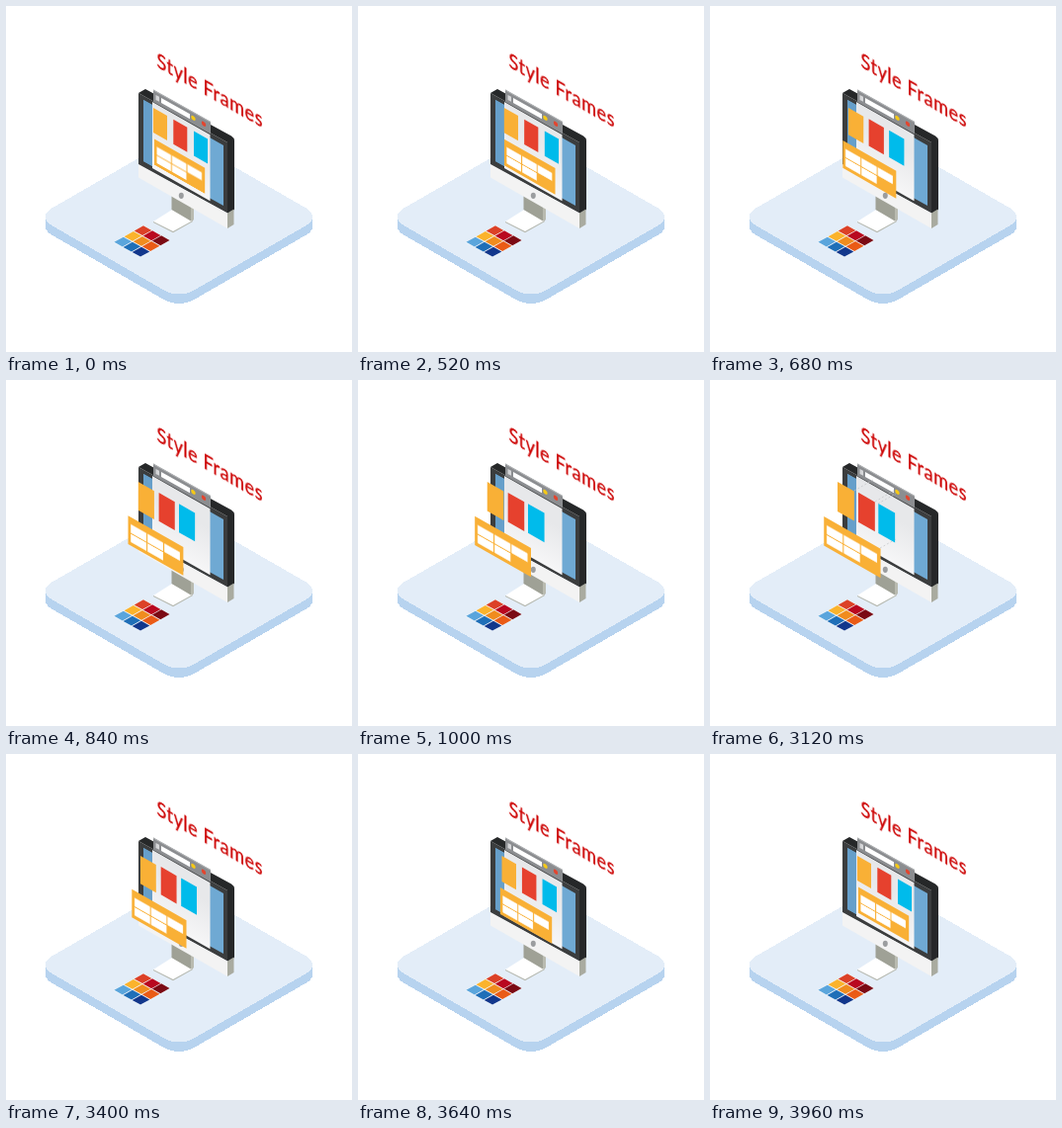
An HTML page for the animation above (4840 ms loop, 350 by 350 pixels).

```html
<!DOCTYPE html>
<html lang="en">
<head>
<meta charset="utf-8">
<title>Style Frames</title>
<style>
  html, body { margin: 0; width: 100%; height: 100%; overflow: hidden; background: #fff; }
  svg { display: block; width: 100vw; height: 100vh; }
  text { font: 400 21px Lato, "Open Sans", sans-serif; letter-spacing: .6px;
         fill: #c00; stroke: #c00; stroke-width: .3; }
  .crisp { shape-rendering: crispEdges; }

  .float { transform: var(--in); animation: float 4840ms infinite; }
  .dashes { fill: none; stroke: #c3c5c8; stroke-width: .8; stroke-dasharray: 2 2; opacity: 0;
            animation: dashes 4840ms linear infinite; }

  .amber { --in: translate(149px, 103px) scale(1); --out: translate(129px, 103px) scale(1.2); }
  .red   { --in: translate(169.3px, 114.7px) scale(1); --out: translate(150px, 113.8px) scale(1.2); }
  .cyan  { --in: translate(190px, 126.5px) scale(1); --out: translate(170.3px, 125px) scale(1.2); }
  .panel { --in: translate(150px, 134.5px) scale(1); --out: translate(115.2px, 138px) scale(1.12); }

  @keyframes float {
    0% { transform: var(--in); }
    9.917% { transform: var(--in); animation-timing-function: cubic-bezier(.25, .25, .25, 1); }
    27.273% { transform: var(--out); }
    64.05% { transform: var(--out); animation-timing-function: cubic-bezier(.4, 0, .4, 1); }
    81.818%, 100% { transform: var(--in); }
  }
  @keyframes dashes {
    0%, 21.488% { opacity: 0; }
    27.273%, 64.05% { opacity: 1; }
    68.18%, 100% { opacity: 0; }
  }
</style>
</head>
<body>
<svg viewBox="0 0 350 350">
  <defs>
    <rect id="slab" x="-83" y="-83" width="166" height="166" rx="17"/>
    <rect id="card" width="14" height="25" transform="matrix(1 .57 0 1 0 0)"/>
    <linearGradient id="page" x2="0" y2="1">
      <stop offset=".3" stop-color="#e7e8ea"/>
      <stop offset="1" stop-color="#f6f6f7"/>
    </linearGradient>
  </defs>

  <!-- platform -->
  <g class="crisp" fill="#b7d3ef">
    <use href="#slab" transform="matrix(.866 .5 -.866 .5 175 222.800)"/>
    <use href="#slab" transform="matrix(.866 .5 -.866 .5 175 219.500)"/>
    <use href="#slab" transform="matrix(.866 .5 -.866 .5 175 216.500)"/>
  </g>
  <use class="crisp" href="#slab" transform="matrix(.866 .5 -.866 .5 175 213.300)" fill="#e3edf8"/>

  <!-- swatches: one unit per cell -->
  <g transform="matrix(9.100 5.050 -10.100 5.700 139 221.800)">
    <rect width="3" height="3" fill="#f4f7fb"/>
    <g id="swatches"></g>
  </g>

  <!-- stand -->
  <path d="M149 218L168 206L189 217L169 228Z" fill="#fff"/>
  <path d="M149 218L169 228L189 217V218L169 229.200L149 219Z" fill="#b5b7ac"/>
  <path d="M167.500 190L190 203V216L187 217.500L167.500 206Z" fill="#9fa196"/>
  <path d="M187 201L190 203V216L187 217.500Z" fill="#b9bbb0"/>

  <!-- monitor -->
  <path d="M134 88L141 84L228 131.500Q231 133.500 231 136V206L224 210V138Z" fill="#262829"/>
  <path d="M224 209.500L230.500 205.500V221L224 225Z" fill="#a9aba0"/>
  <path d="M134 88L224 138V209.500L134 160.500Z" fill="#3b3d3e"/>
  <path d="M134 160L224 209.500V225L134 173.500Z" fill="#f3f3f3"/>
  <path d="M139 95L220 141V202L139 157Z" fill="#6fa9d3"/>
  <path d="M139 95L148 100V162L139 157Z" fill="#669fca"/>
  <ellipse cx="177.300" cy="191.800" rx="2.500" ry="3.100" fill="#9b9d9f"/>

  <!-- browser window -->
  <rect width="58.500" height="67" transform="matrix(1 .57 0 1 148 97)" fill="url(#page)"/>
  <g transform="matrix(1 .56 0 1 149 84.500)">
    <rect width="58" height="12.500" fill="#8b8d90"/>
    <rect width="58" height="1" fill="#b4b6b8"/>
    <rect x="2.500" y="4" width="3.500" height="5" fill="#d5d6d8"/>
    <rect x="8" y="4" width="29" height="5" fill="#fff"/>
    <circle cx="40.500" cy="6.200" r="2.200" fill="#f6c915"/>
    <circle cx="51" cy="6.200" r="2.200" fill="#e2452f"/>
  </g>

  <path class="dashes" d="M146 112L165 101M167 123L186 112M172 170L188 161M170 125L188 115"/>

  <!-- floating parts -->
  <use href="#card" class="float amber" fill="#f9b036"/>
  <use href="#card" class="float red" fill="#e6412e"/>
  <use href="#card" class="float cyan" fill="#00bbeb"/>
  <g class="float panel">
    <g transform="matrix(1 .57 0 1 0 0)">
      <rect width="51" height="26" fill="#f9b036"/>
      <path d="M2.500 6.500h14.500v8H2.500ZM18 6.500h14.500v8H18ZM33.500 6.500h14.500v8H33.500ZM2.500 15.500h14.500v7.500H2.500ZM18 15.500h14.500v7.500H18Z" fill="#fff"/>
    </g>
  </g>

  <text transform="matrix(.866 .5 0 1 152.500 61.500)">Style Frames</text>
</svg>
<script>
  const rows = [
    ["#dc4127", "#b9081f", "#7b0a14"],
    ["#fbb32c", "#f08c1e", "#ea5b16"],
    ["#5aa5dc", "#1f6fb8", "#12378c"]
  ];
  document.getElementById("swatches").innerHTML = rows.map((row, y) =>
    row.map((color, x) =>
      `<rect x="${x + .04}" y="${y + .04}" width=".92" height=".92" fill="${color}"/>`
    ).join("")
  ).join("");
</script>
</body>
</html>
```
